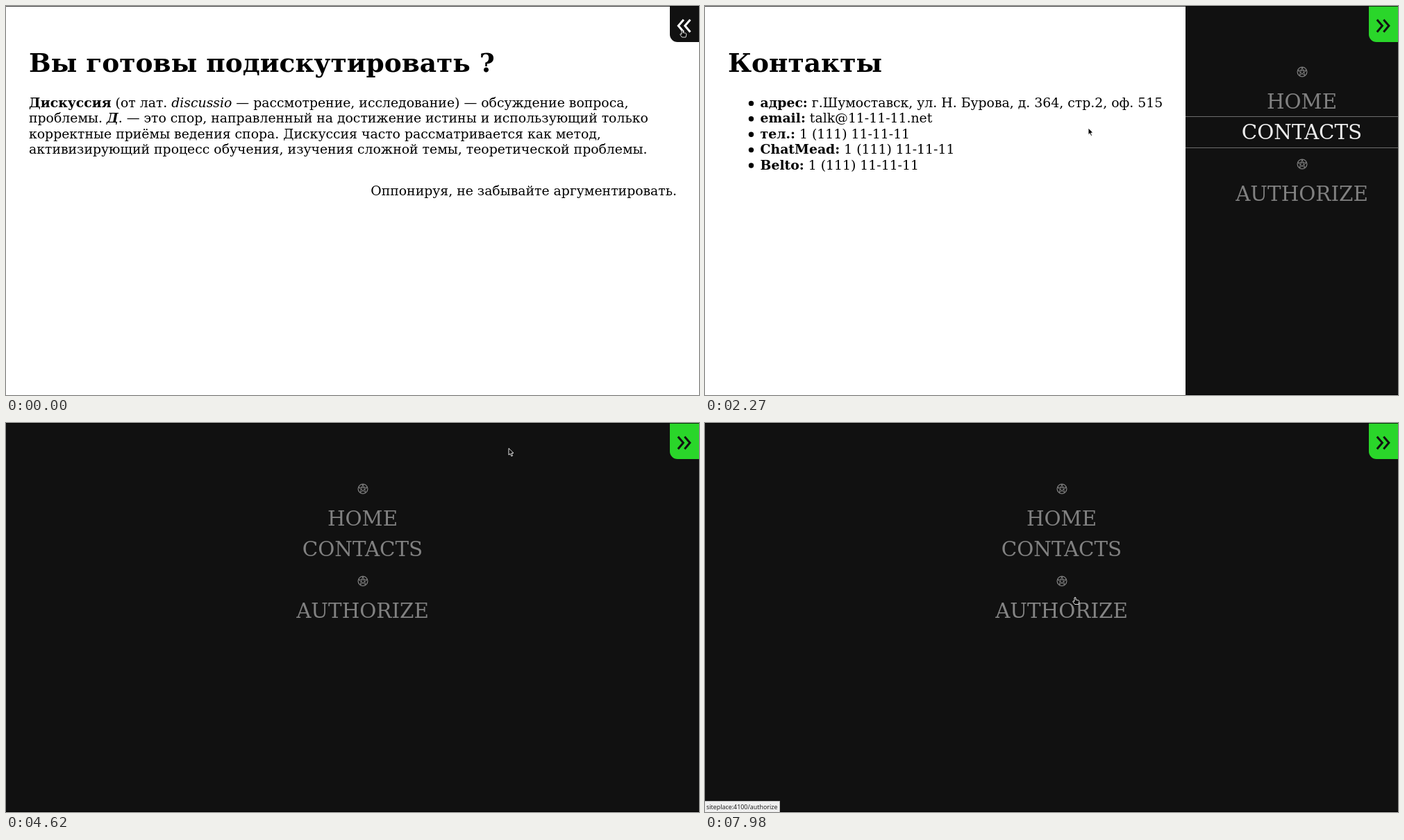
These frames come from a looping animation (998 by 561 pixels, 8000 ms). An HTML page:

```html
<!DOCTYPE html>
<html lang="ru">
<head>
<meta charset="utf-8">
<title>Side menu</title>
<style>
html, body { margin: 0; width: 100%; height: 100%; overflow: hidden; background: #fff; }
#stage { position: relative; width: 998px; height: 561px; overflow: hidden; font-family: "DejaVu Serif", serif; }
svg { position: absolute; left: 0; top: 0; }
.page { font-size: 18.83px; fill: #000; white-space: pre; }
.page .title { font-size: 37.5px; font-weight: bold; }
.page .b { font-weight: bold; }
.page .i { font-style: italic; }
.panel { position: absolute; top: 0; right: 0; height: 561px; overflow: hidden; background: #111; }
.panel::after { content: ""; position: absolute; left: 0; right: 0; bottom: 0; height: 1px; background: #000; }
.item {
  position: absolute; left: 0; width: 100%; height: 46px; box-sizing: border-box;
  padding: 0 9px 0 38px; border: solid transparent; border-width: 1px 0;
  font-size: 29.35px; line-height: 45px; text-align: center; white-space: nowrap; color: #818181;
}
.panel svg { left: calc(50% + 6.5px); }
#button { position: absolute; left: 956.4px; top: 0; width: 42px; height: 51.6px; border-radius: 0 0 0 11px; }
#topline { position: absolute; left: 0; top: 0; width: 100%; height: 1px; background: rgba(0, 0, 0, .75); }
#status {
  position: absolute; left: 0; bottom: 0; height: 15px; padding: 0 3px 0 2px;
  border: solid #bbb; border-width: 1px 1px 0 0; background: #efefef; color: #222;
  font: 8.9px/16px "Noto Sans", sans-serif; white-space: nowrap;
}
</style>
</head>
<body>
<div id="stage">
  <svg class="page" id="home" width="998" height="561">
    <text class="title" x="33" y="94.5">Вы готовы подискутировать ?</text>
    <text x="33" y="146"><tspan class="b">Дискуссия</tspan> (от лат. <tspan class="i">discussio</tspan> — рассмотрение, исследование) — обсуждение вопроса,</text>
    <text x="33" y="168.4">проблемы. <tspan class="b i">Д</tspan>. — это спор, направленный на достижение истины и использующий только</text>
    <text x="33" y="190.8">корректные приёмы ведения спора. Дискуссия часто рассматривается как метод,</text>
    <text x="33" y="213.2">активизирующий процесс обучения, изучения сложной темы, теоретической проблемы.</text>
    <text x="966" y="273" text-anchor="end">Оппонируя, не забывайте аргументировать.</text>
  </svg>
  <svg class="page" id="contacts" width="998" height="561">
    <text class="title" x="33" y="94.5">Контакты</text>
  </svg>
  <div class="panel"></div>
  <div class="panel"></div>
  <div id="button">
    <svg width="42" height="52" fill="none" stroke-width="3">
      <path id="chevrons" d="M11.8 19.8 L19.4 28.6 L11.8 37.4 M21.3 19.8 L28.9 28.6 L21.3 37.4"/>
    </svg>
  </div>
  <div id="topline"></div>
  <div id="status"></div>
  <svg width="998" height="561">
    <g id="cursor" stroke-linejoin="round">
      <path data-kind="arrow" fill="#000" stroke="#fff" stroke-width=".9" d="M0 0 V9.6 L2.2 7.7 L3.9 11.4 L5.5 10.7 L3.9 7.1 L6.9 6.8 Z"/>
      <path data-kind="hand" fill="#000" stroke="#fff" stroke-width=".9" d="M-1 .5 Q0 -.8 1 .5 V3.5 L4.8 4.2 Q6 4.5 5.8 6 L5 10 H-.5 L-3.2 6.2 Q-3.2 5 -2 5.2 L-1 6 Z"/>
      <path data-kind="beam" fill="none" stroke="#666" stroke-width="1" d="M-3 -5 H-.8 L0 -4.4 L.8 -5 H3 M0 -4.4 V4.4 M-3 5 H-.8 L0 4.4 L.8 5 H3"/>
    </g>
  </svg>
</div>
<script>
const LOOP = 8000, W = 998, H = 561, SLIDE = 300;
const $ = id => document.getElementById(id);
const clamp = v => Math.max(0, Math.min(1, v));

// contact list
const rows = [
  ["адрес:", "г.Шумоставск, ул. Н. Бурова, д. 364, стр.2, оф. 515"],
  ["email:", "talk@11-11-11.net"],
  ["тел.:", "1 (111) 11-11-11"],
  ["ChatMead:", "1 (111) 11-11-11"],
  ["Belto:", "1 (111) 11-11-11"]
];
$("contacts").innerHTML += rows.map(([name, value], i) => {
  const y = 146 + i * 22.4;
  return `<circle cx="66.5" cy="${y - 5.6}" r="3.7"/>` +
    `<text x="79.5" y="${y}"><tspan class="b">${name}</tspan> ${value}</text>`;
}).join("");

// menu links: hover intervals [on, off, click]
const links = [
  { label: "HOME", top: 115, path: "", hover: [[1100, 1400, 9e9], [5380, 5733, 5570]] },
  { label: "CONTACTS", top: 159, path: "contacts", hover: [[1400, 2255, 1965]] },
  { label: "AUTHORIZE", top: 248, path: "authorize", hover: [[7965, 9e9, 9e9]] }
];

function emblem(cy) {
  let star = "";
  for (let k = 0; k < 5; k++) {
    const a = k * 4 * Math.PI / 5 - Math.PI / 2;
    star += `${(8 + 6.8 * Math.cos(a)).toFixed(2)},${(8 + 6.8 * Math.sin(a)).toFixed(2)} `;
  }
  return `<svg width="16" height="16" style="top:${cy - 8}px" fill="none" stroke="#818181">` +
    `<circle cx="8" cy="8" r="6.9" stroke-width="1.2"/><polygon points="${star}"/></svg>`;
}

const panels = [...document.querySelectorAll(".panel")];
for (const p of panels) {
  p.innerHTML = emblem(94.5) + emblem(227.5) +
    links.map(l => `<div class="item" style="top:${l.top}px">${l.label}</div>`).join("");
}
const items = panels.map(p => [...p.querySelectorAll(".item")]);

// the standard CSS "ease" curve
function ease(x) {
  x = clamp(x);
  const bez = (s, a, b) => 3 * (1 - s) * (1 - s) * s * a + 3 * (1 - s) * s * s * b + s * s * s;
  let lo = 0, hi = 1;
  for (let i = 0; i < 24; i++) {
    const mid = (lo + hi) / 2;
    if (bez(mid, .25, .25) < x) lo = mid; else hi = mid;
  }
  return bez(lo, .1, 1);
}

// menu open from / close from
const spans = [[479.7, 2147.7], [4005.3, 5645.2], [7230, 9e9]];
const openness = t => spans.reduce((v, [a, b]) =>
  v + ease((t - a) / SLIDE) - ease((t - b) / SLIDE), 0);
const isOpen = t => spans.some(([a, b]) => t >= a && t < b + SLIDE);

const pauses = [
  [610, 60, 275, 20.1], [2270, 70], [4040, 110], [4620, 40], [5830, 120, 25, 13.35]
];

// pointer keys: time, x, y, shape from here on
const moves = [
  [0, 974, 35, "hand"], [670, 974, 35, "hand"], [750, 925, 48, "arrow"],
  [1080, 570, 122, "arrow"], [1140, 548, 130, "hand"], [1180, 546, 131, "hand"],
  [1740, 552, 176, "hand"], [2255, 552, 176, "arrow"], [2780, 552, 176, "arrow"],
  [3270, 957, 28, "hand"], [3350, 980, 15, "hand"], [3500, 980, 15, "hand"],
  [3620, 981.5, 21, "hand"], [4150, 981.5, 21, "hand"], [4210, 950, 24, "arrow"],
  [4620, 724, 36.5, "arrow"], [4780, 690, 46, "arrow"], [4820, 688, 47, "arrow"],
  [5380, 510, 118, "hand"], [5540, 492, 131.5, "hand"], [5733, 492, 131.5, "beam"],
  [5950, 492, 131.5, "beam"], [6140, 699, 176, "beam"], [6290, 699, 176, "beam"],
  [6500, 790, 124, "arrow"], [6860, 956, 44, "hand"], [6970, 974, 29, "hand"],
  [7400, 974, 29, "hand"], [7450, 940, 52, "arrow"], [7740, 640, 222, "arrow"],
  [7960, 533, 251.5, "hand"], [LOOP, 533, 251.5, "hand"]
];

function pointer(t) {
  let i = 0;
  while (i < moves.length - 2 && moves[i + 1][0] <= t) i++;
  const [t0, x0, y0, kind] = moves[i], [t1, x1, y1] = moves[i + 1];
  const k = clamp((t - t0) / (t1 - t0));
  return { x: x0 + (x1 - x0) * k, y: y0 + (y1 - y0) * k, kind };
}

function paintItem(el, link, t) {
  let glow = 0, line = 0;
  for (const [on, off, click] of link.hover) {
    const v = t < off ? ease((t - on) / SLIDE) : 1 - ease((t - off) / SLIDE);
    glow += v;
    if (t >= click) line += v;
  }
  const c = Math.round(129 + 112 * clamp(glow));
  el.style.color = `rgb(${c},${c},${c})`;
  el.style.borderColor = `rgba(129,129,129,${.85 * clamp(line)})`;
}

function draw(now) {
  let t = now % LOOP, tear = H, lag = 0;
  const pause = pauses.find(([a, d]) => t >= a && t < a + d);
  if (pause) {
    t = pause[0];
    tear = pause[2] || H;
    lag = pause[3] || 0;
  }

  const onContacts = t >= 1965 && t < 5600;
  $("home").style.display = onContacts ? "none" : "";
  $("contacts").style.display = onContacts ? "" : "none";

  panels.forEach((p, n) => {
    p.style.width = Math.round(W * openness(t - n * lag)) + "px";
    p.style.clipPath = n ? `inset(${tear}px 0 0 0)` : `inset(0 0 ${H - tear}px 0)`;
    items[n].forEach((el, i) => paintItem(el, links[i], t));
  });

  const { x, y, kind } = pointer(t);
  const open = isOpen(t), over = x >= 956 && y < 52;
  $("button").style.background = open ? "#2ad62a" : "#111";
  $("chevrons").setAttribute("stroke", over ? "#fff" : open ? "#111" : "#2ad62a");
  $("chevrons").setAttribute("transform", open ? "" : "translate(41.2 0) scale(-1 1)");

  const target = links.find(l => l.hover.some(([on, off, click]) => t >= on && t < Math.min(off, click)));
  $("status").style.display = target ? "" : "none";
  if (target) $("status").textContent = "siteplace:4100/" + target.path;

  $("cursor").setAttribute("transform", `translate(${x.toFixed(2)} ${y.toFixed(2)})`);
  for (const shape of $("cursor").children) {
    shape.style.display = shape.dataset.kind === kind ? "" : "none";
  }
}

const start = performance.now();
function tick() {
  draw(performance.now() - start);
  requestAnimationFrame(tick);
}
tick();
</script>
</body>
</html>
```
